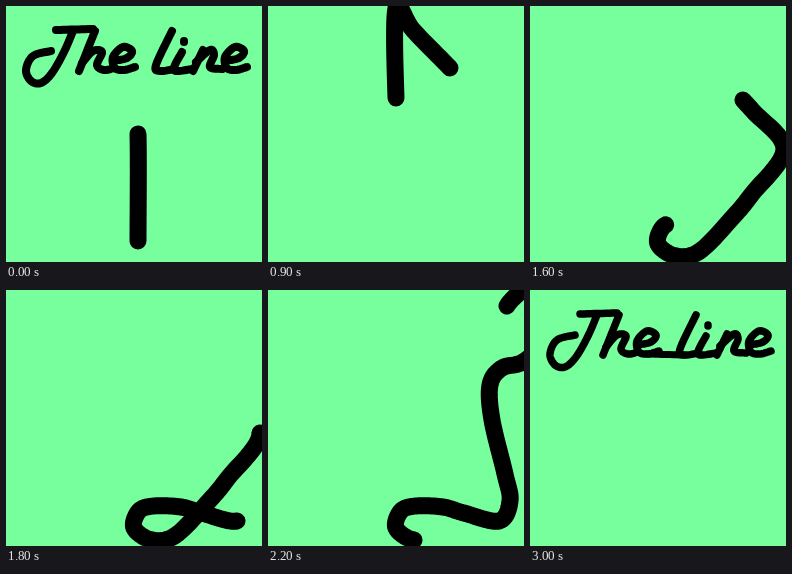
Recreate the animation shown at these times as an HTML page with a canvas. Size 256 px wide and 256 px high, loop 3200 ms.

```html
<!DOCTYPE html>
<html lang="en">
<head>
<meta charset="utf-8">
<title>The line</title>
<style>
  html, body { margin: 0; width: 100%; height: 100%; overflow: hidden; background: #77ff9d; }
  canvas { display: block; width: 100vw; height: 100vh; }
</style>
</head>
<body>
<canvas width="256" height="256" role="img" aria-label="The line"></canvas>
<script>
const ctx = document.querySelector('canvas').getContext('2d');
const LOOP = 3200, STEP = 100;
const START = 4, WRITE = 23, LINK = 27, END = 30;
const SAMPLES = 12;

// Smooth curve through the points of a string such as "1,2 3,4".
function curve(text, dx = 0) {
  const pts = text.trim().split(/\s+/).map(p => p.split(',').map(Number));
  const at = k => pts[Math.max(0, Math.min(pts.length - 1, k))];
  const path = new Path2D(), lengths = [];
  let last, total = 0;
  for (let s = 0; s <= (pts.length - 1) * SAMPLES; s++) {
    const i = Math.floor(s / SAMPLES), f = s / SAMPLES - i;
    const [a, b, c, d] = [i - 1, i, i + 1, i + 2].map(at);
    const [x, y] = [0, 1].map(k => b[k] + f / 2 * (c[k] - a[k]
      + f * (2 * a[k] - 5 * b[k] + 4 * c[k] - d[k]
      + f * (3 * (b[k] - c[k]) + d[k] - a[k]))));
    path.lineTo(x + dx, y);
    if (last) total += Math.hypot(x - last[0], y - last[1]);
    if (f === 0) lengths.push(total);
    last = [x, y];
  }
  return { path, lengths };
}

const route = curve(`132,235 132,128 128,92 128,2 145,24 182,62 222,104 254,143 222,188 203,211
  170,245 146,250 128,238 133,221 148,216 175,217 196,223 231,231 242,211 237,184 224,130
  222,95 234,78 258,70 290,35 268,-12 252,2 239,16 236,32`);

// Step, then the route points where the tail and the head are.
const poses = [[START, 0, 1], [9, 2, 5], [13, 4, 8], [18, 7, 17], [22, 11, 27], [26, 19, 28], [END, 23, 28]];

const e = dx => [curve('107,55 121,52 126,45 117,41 107,51 109,62 118,64 129,61', dx)];
// Strokes in the order in which the line writes them.
const letters = [
  e(112),
  [curve('197,44 187,65'), curve('190,56 204,44 208,49 204,61 216,63')],
  [curve('176,46 168,64 186,63'), curve('178,35 178,36')],
  [curve('166,25 150,59 154,65 168,63')],
  e(0),
  [curve('89,25 73,65'), curve('76,57 87,45 96,46 91,59 98,64 108,62')],
  [curve('50,24 87,23')],
  [curve('67,25 58,46 46,67 35,77 25,75 20,64 27,50 45,45')]
];
const link = curve('118,64 154,65');

function stroke({ path }, width) {
  ctx.lineWidth = width;
  ctx.stroke(path);
}

function drawLine(step) {
  const n = Math.max(1, poses.findIndex(p => p[0] > step));
  const [from, to] = [poses[n - 1], poses[n]];
  const f = (step - from[0]) / (to[0] - from[0]);
  const [tail, head] = [1, 2].map(k => {
    const a = route.lengths[from[k]], b = route.lengths[to[k]];
    return a + (b - a) * f;
  });
  ctx.setLineDash([head - tail, 9999]);
  ctx.lineDashOffset = -tail;
  stroke(route, 17);
  ctx.setLineDash([]);
}

function draw(time) {
  const step = Math.max(START, Math.floor(time % LOOP / STEP));
  const title = step === START;
  ctx.fillStyle = '#77ff9d';
  ctx.fillRect(0, 0, 256, 256);
  ctx.lineCap = ctx.lineJoin = 'round';
  if (step < END) drawLine(step);
  letters.forEach((strokes, i) => {
    if (title || step >= WRITE + i) strokes.forEach(s => stroke(s, title ? 8 : 7.5));
  });
  if (step >= LINK) stroke(link, 7);
}

const began = performance.now();
function tick() {
  draw(performance.now() - began);
  requestAnimationFrame(tick);
}
tick();
</script>
</body>
</html>
```
